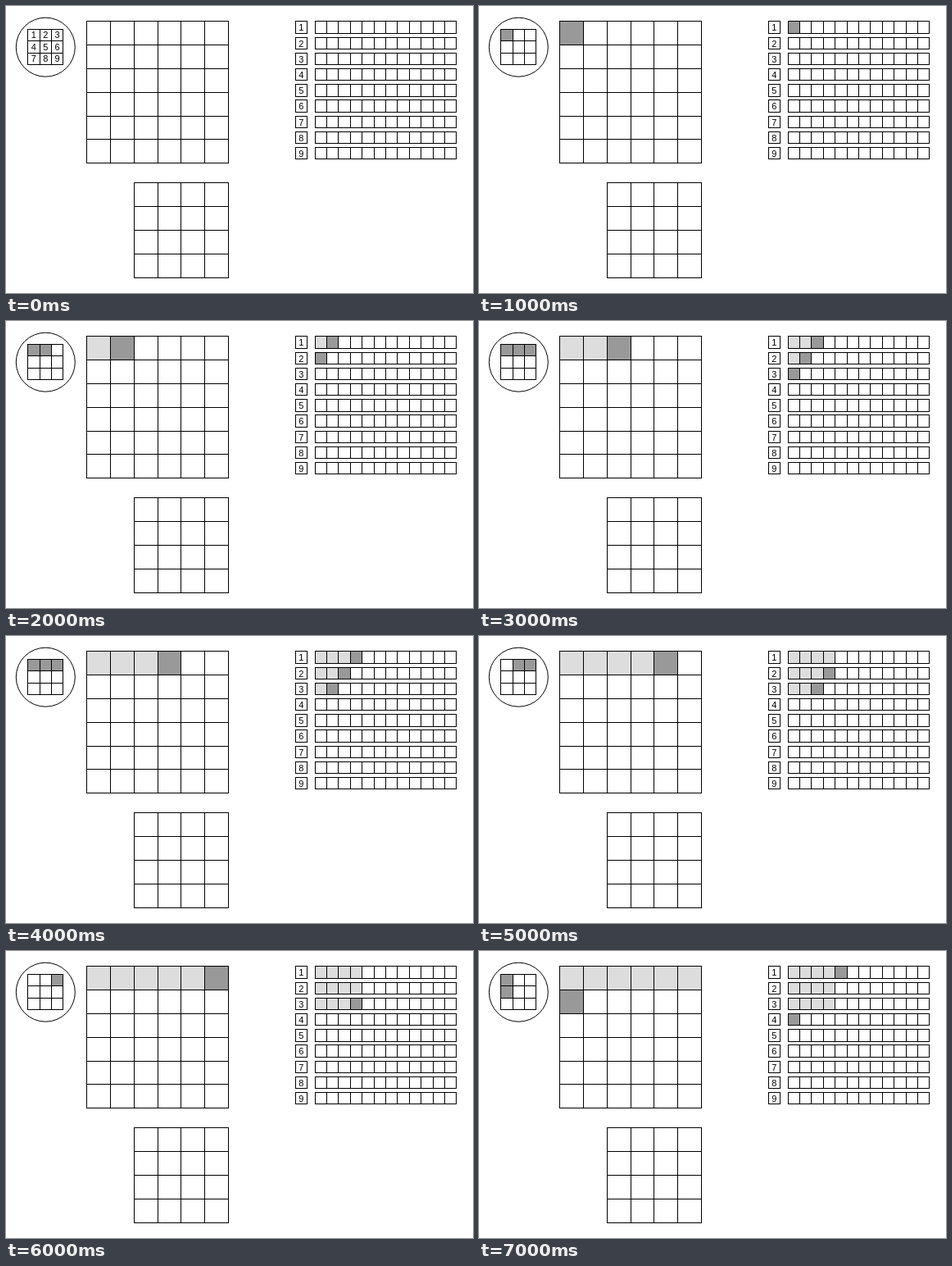
An HTML page with a canvas for the animation above (8 s loop, 570 by 350 pixels).

```html
<!DOCTYPE html>
<html>
<head>
<meta charset="utf-8">
<title>Convolution taps</title>
<style>
html, body { margin: 0; width: 100%; height: 100%; overflow: hidden; background: #fff; }
canvas { display: block; }
</style>
</head>
<body>
<canvas id="stage" width="570" height="350"></canvas>
<script>
const ctx = document.getElementById('stage').getContext('2d');
const LIGHT = '#ddd', DARK = '#999', WHITE = '#fff';
const STEPS = 8, STEP_MS = 1000;
const INPUT = 6, KERNEL = 3, OUTPUT = INPUT - KERNEL + 1;
const BIG = 28.8, SMALL = 14.4, ROW = 19.2, TOP = 18.9;

const snap = v => Math.floor(v) + 0.5;

function grid(x, y, cols, rows, size, colour = () => WHITE) {
  for (let r = 0; r < rows; r++) {
    for (let c = 0; c < cols; c++) {
      const left = snap(x + c * size), top = snap(y + r * size);
      const box = [left, top, snap(x + (c + 1) * size) - left, snap(y + (r + 1) * size) - top];
      ctx.fillStyle = colour(r * cols + c);
      ctx.fillRect(...box);
      ctx.strokeRect(...box);
    }
  }
}

function label(text, x, y) {
  ctx.fillStyle = '#000';
  ctx.fillText(text, x, y);
}

// A tap touches a pixel when the window it implies lies inside the input.
function touches(tap, pixel) {
  const row = Math.floor(pixel / INPUT) - Math.floor(tap / KERNEL);
  const col = pixel % INPUT - tap % KERNEL;
  return row >= 0 && row < OUTPUT && col >= 0 && col < OUTPUT;
}

const shade = (index, current, active = true) =>
  index < current ? LIGHT : index === current && active ? DARK : WHITE;

function draw(step) {
  const pixel = step - 1;
  ctx.fillStyle = WHITE;
  ctx.fillRect(0, 0, 570, 350);
  ctx.strokeStyle = '#000';
  ctx.lineWidth = 1;
  ctx.font = '11px "Liberation Sans", Arial, sans-serif';
  ctx.textAlign = 'center';

  ctx.beginPath();
  ctx.arc(48.3, 50.2, 36, 0, Math.PI * 2);
  ctx.stroke();

  grid(26.6, 28.5, KERNEL, KERNEL, SMALL,
    tap => pixel >= 0 && touches(tap, pixel) ? DARK : WHITE);
  grid(98.6, TOP, INPUT, INPUT, BIG, i => shade(i, pixel));
  grid(156.2, 215.9, OUTPUT, OUTPUT, BIG);

  for (let tap = 0; tap < KERNEL * KERNEL; tap++) {
    const y = TOP + tap * ROW;
    let done = 0;
    for (let p = 0; p < pixel; p++) done += touches(tap, p);
    const active = pixel >= 0 && touches(tap, pixel);

    grid(353, y, 1, 1, SMALL);
    label(tap + 1, 360.3, Math.floor(y) + 12);
    grid(377.1, y, 12, 1, SMALL, i => shade(i, done, active));

    if (step === 0) {
      label(tap + 1, 33.8 + tap % KERNEL * SMALL,
        Math.round(39.4 + Math.floor(tap / KERNEL) * SMALL));
    }
  }
}

function tick() {
  draw(Math.floor(performance.now() / STEP_MS) % STEPS);
  requestAnimationFrame(tick);
}
tick();
</script>
</body>
</html>
```
